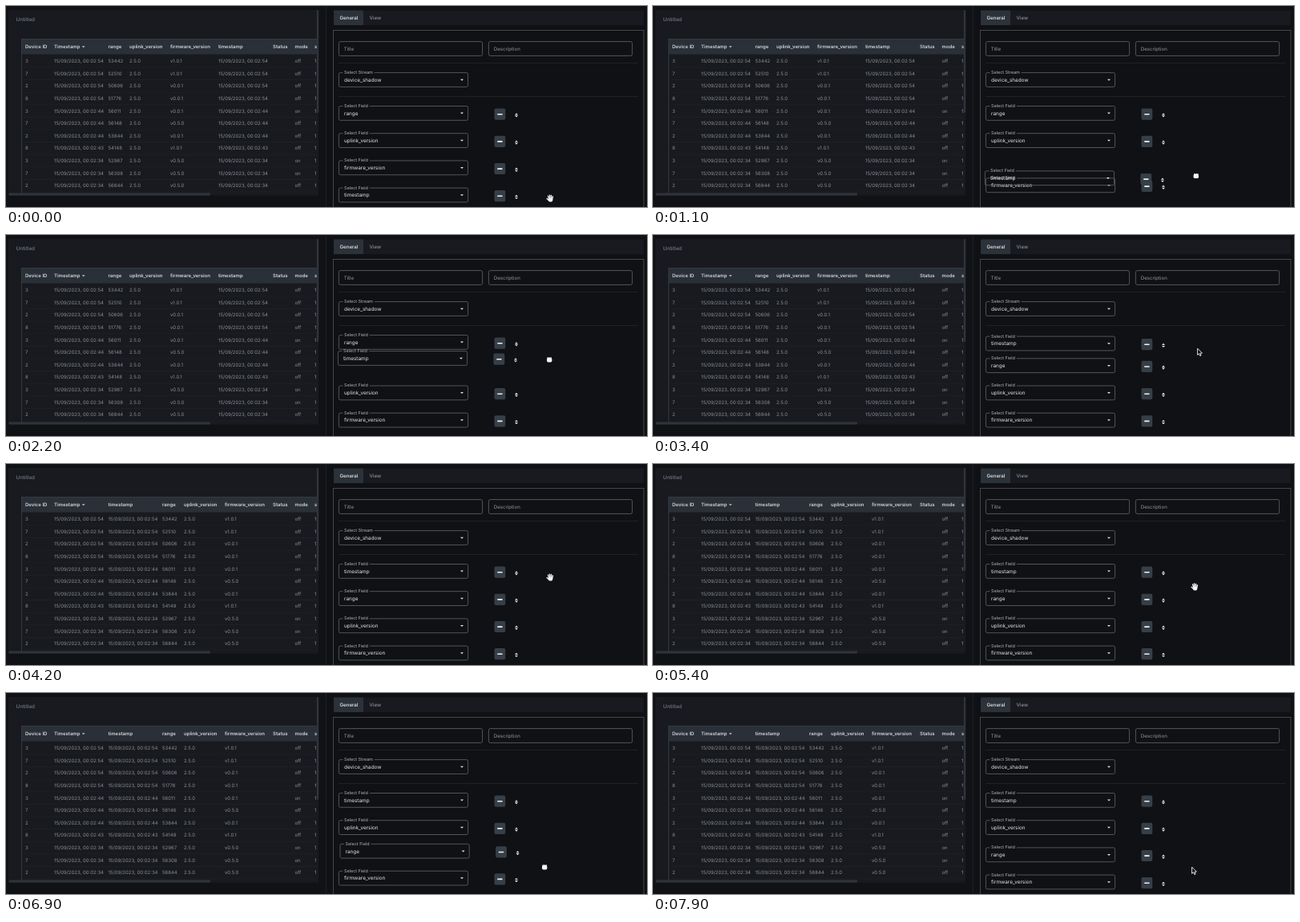
An HTML page with a canvas that plays this animation: 800x252 px, repeating every 8 s.

```html
<!DOCTYPE html>
<html lang="en">
<head>
<meta charset="utf-8">
<title>Table column order</title>
<style>
html, body { margin: 0; width: 100%; height: 100%; overflow: hidden; background: #111216; }
canvas { display: block; }
</style>
</head>
<body>
<canvas id="stage" width="800" height="252"></canvas>
<script>
const ctx = document.getElementById('stage').getContext('2d');
ctx.textRendering = 'geometricPrecision';

const LOOP = 8000, STEP = 100;
const TOP = 134.4, PITCH = 34.2, GAP = 29.3;
const slot = i => TOP + i * PITCH;

// time, x, y of the pointer
const POINTER = [
  [0, 679, 241], [700, 679, 241], [1400, 676.5, 191.5], [1500, 676, 184],
  [1600, 676, 178], [2100, 678, 158.5], [2200, 678, 156], [2500, 679, 142],
  [5200, 679, 142], [5800, 670, 177.5], [6300, 670, 177.5], [6400, 670, 181],
  [6900, 672, 218]
];

const RANGES = [53442, 52510, 50606, 51776, 56011, 56148, 53844, 54148, 52967, 56308, 56844];
const FIRMWARE = ['1.0', '1.0', '0.0', '0.0', '0.0', '0.5', '0.0', '1.0', '0.5', '0.5', '0.5'];
const SECONDS = [54, 54, 54, 54, 44, 44, 44, 43, 34, 34, 34];
const stamp = i => '15/09/2023, 00:02:' + SECONDS[i];
const version = i => 'v' + FIRMWARE[i] + (FIRMWARE[i] === '0.5' ? '.0' : '.1');

const clamp = p => Math.max(0, Math.min(1, p));
const ease = p => 1 - (1 - clamp(p)) ** 2;
const mix = (a, b, p) => a + (b - a) * p;

function pointer(time) {
  const t = Math.max(0, time);
  const k = POINTER.findIndex(key => key[0] > t);
  if (k < 0) return POINTER[POINTER.length - 1].slice(1);
  const a = POINTER[k - 1], b = POINTER[k], p = (t - a[0]) / (b[0] - a[0]);
  return [mix(a[1], b[1], p), mix(a[2], b[2], p)];
}

function rect(x, y, w, h, color, r = 0) {
  ctx.fillStyle = color;
  ctx.beginPath();
  ctx.roundRect(x, y, w, h, r);
  ctx.fill();
}

// returns the width of the text
function text(str, x, y, size, color, weight = 400) {
  ctx.font = `${weight} ${size}px Inter, sans-serif`;
  ctx.fillStyle = color;
  ctx.fillText(str, x, y + size * 0.36);
  return ctx.measureText(str).width;
}

// a negative h points up
function triangle(x, y, w, h, color) {
  ctx.fillStyle = color;
  ctx.beginPath();
  ctx.moveTo(x - w / 2, y - h / 2);
  ctx.lineTo(x + w / 2, y - h / 2);
  ctx.lineTo(x, y + h / 2);
  ctx.fill();
}

// gap is the width of the opening for a label in the top edge
function outline(x, y, w, h, gap = 0) {
  ctx.save();
  if (gap) {
    ctx.beginPath();
    ctx.rect(x - 2, y - 2, w + 4, h + 4);
    ctx.rect(x + 5, y - 2, gap, 4);
    ctx.clip('evenodd');
  }
  ctx.strokeStyle = '#63666b';
  ctx.lineWidth = 0.8;
  ctx.beginPath();
  ctx.roundRect(x, y, w, h, 2);
  ctx.stroke();
  ctx.restore();
}

function select(label, value, y, dx = 0) {
  const width = text(label, 422 + dx, y - 9.4, 5.45, '#b4b6b9');
  outline(415.4 + dx, y - 8.9, 161.2, 17.8, width + 3.5);
  text(value, 422 + dx, y, 6.4, '#e6e7e8');
  triangle(569 + dx, y + 0.2, 4, 2, '#e6e7e8');
}

function field(name, y, dx = 0) {
  select('Select Field', name, y, dx);
  rect(609.5 + dx, y - 5.9, 13.8, 14.2, '#363f48', 2);
  rect(613.2 + dx, y + 0.5, 6.4, 1.6, '#f2f3f4', 0.4);
  triangle(637 + dx, y + 0.9, 4, -2.2, '#e6e7e8');
  triangle(637 + dx, y + 4, 4, 2.2, '#e6e7e8');
}

function table(t) {
  const moved = t >= 4200;
  const columns = [
    ['Device ID', 24, i => [3, 7, 2, 8][i % 4]],
    ['Timestamp', 60, stamp],
    ['range', moved ? 195 : 127.5, i => RANGES[i]],
    ['uplink_version', moved ? 222 : 154, () => '2.5.0'],
    ['firmware_version', moved ? 273 : 205, version],
    ['timestamp', moved ? 127.5 : 265, stamp],
    ['Status', 333, () => ''],
    ['mode', 360.5, i => [4, 8, 9].includes(i) ? 'on' : 'off'],
    ['s', 385, () => '1']
  ];
  rect(3, 5, 387, 232.5, '#181a1f', 1);
  text('Untitled', 12.5, 16.3, 6.3, '#737a83', 500);
  ctx.save();
  ctx.beginPath();
  ctx.rect(19, 40, 369.5, 195);
  ctx.clip();
  rect(19.5, 41.5, 369, 19, '#2a3037');
  for (let i = 0; i < 11; i++) rect(19.5, 76.7 + i * 15.6, 369, 0.6, '#1f2226');
  ctx.strokeStyle = '#3a4047';
  ctx.lineWidth = 0.8;
  ctx.strokeRect(19.5, 41.5, 400, 220);
  for (const [title, x, cell] of columns) {
    text(title, x, 51, 6, '#d3d6d9', 600);
    for (let i = 0; i < 11; i++) text(cell(i), x, 69.1 + i * 15.6, 6, '#8b8f95');
  }
  triangle(96.7, 51.2, 3.8, 2, '#c4c7ca');
  ctx.restore();
  rect(3.5, 234.5, 251.5, 3, '#30343a', 1);
  rect(387.8, 5, 2.4, 129, '#30343a', 1);
}

function form() {
  rect(398.8, 0, 1.2, 252, '#1b1d21');
  rect(400, 0, 400, 252, '#101114');
  rect(409, 5.5, 387, 18.5, '#181a1f');
  rect(409, 5.5, 37, 18.5, '#2b3239', 1);
  text('General', 416.5, 14.8, 6.15, '#eceded', 500);
  text('View', 453.5, 14.8, 6.15, '#8d9197', 500);
  ctx.strokeStyle = '#494c51';
  ctx.lineWidth = 0.9;
  ctx.strokeRect(408.5, 30.5, 387.5, 240);
  outline(415.4, 44.6, 179.2, 17.8);
  text('Title', 421.7, 53.8, 6.1, '#94979b');
  outline(602.4, 44.6, 179.2, 17.8);
  text('Description', 608.8, 53.8, 6.1, '#94979b');
  rect(415, 71.2, 374, 0.7, '#25272b');
  select('Select Stream', 'device_shadow', 92.5);
  rect(415, 113.2, 374, 0.7, '#25272b');
}

function firstDrag(t) {
  const shift = start => GAP * ease((t - start) / 200);
  const [x, y] = pointer(t - STEP);
  const held = slot(3) + y - 241;
  field('range', slot(0) + shift(2300));
  field('uplink_version', slot(1) + shift(1600));
  field('firmware_version', slot(2) + shift(1000));
  field('timestamp', mix(held, slot(0), ease((t - 3300) / 300)), x - 679);
}

function secondDrag(t) {
  const shift = GAP * ease((t - 6600) / 200);
  const [x, y] = pointer(t - STEP);
  const drop = ease((t - 7400) / 400);
  const squeeze = PITCH - GAP;
  field('timestamp', slot(0));
  field('uplink_version', slot(2) - squeeze - shift);
  field('firmware_version', slot(3) - squeeze);
  field('range', mix(slot(1) + y - 181, slot(2), drop), (x - 670) * (1 - drop));
}

function fields(t) {
  const list = names => names.forEach((name, i) => field(name, slot(i)));
  if (t < 3800) firstDrag(t);
  else if (t < 6500) list(['timestamp', 'range', 'uplink_version', 'firmware_version']);
  else if (t < 7900) secondDrag(t);
  else list(['timestamp', 'uplink_version', 'range', 'firmware_version']);
}

function arrow() {
  ctx.fillStyle = '#08090a';
  ctx.strokeStyle = '#f4f4f4';
  ctx.lineWidth = 0.9;
  ctx.beginPath();
  [[0.6, 0.2], [0.6, 8.4], [2.5, 6.7], [3.8, 9.6], [5.1, 9], [3.9, 6.2], [6.4, 6.1]]
    .forEach(p => ctx.lineTo(...p));
  ctx.closePath();
  ctx.fill();
  ctx.stroke();
}

function openHand() {
  ctx.strokeStyle = '#f6f6f6';
  ctx.lineWidth = 1.4;
  ctx.lineCap = 'round';
  ctx.beginPath();
  [[-2.4, -2.8, -1.2, 1], [-0.5, -3.8, 0, 1], [1.5, -3.5, 1.4, 1],
   [3.4, -2, 2.7, 1.6], [-3.8, 0.4, -1.8, 2.4]].forEach(([a, b, c, d]) => {
    ctx.moveTo(a, b);
    ctx.lineTo(c, d);
  });
  ctx.stroke();
  rect(-2, 0.2, 5.2, 4.4, '#f6f6f6', 1.8);
}

function fist() {
  rect(-3, -2, 6.4, 5.4, '#f6f6f6', 1.9);
  for (let i = 0; i < 4; i++) rect(-2.6 + i * 1.45, -2.8, 1.25, 2, '#f6f6f6', 0.6);
}

function cursor(t) {
  ctx.save();
  ctx.translate(...pointer(t));
  if (t >= 7500 || (t >= 3400 && t < 3800)) arrow();
  else if (t >= 6500 || (t >= 100 && t < 3400)) fist();
  else openHand();
  ctx.restore();
}

function draw(now) {
  const t = Math.floor(now % LOOP / STEP) * STEP;
  rect(0, 0, 800, 252, '#111216');
  table(t);
  form();
  fields(t);
  cursor(t);
}

const start = performance.now();
function tick() {
  draw(Math.max(0, performance.now() - start));
  requestAnimationFrame(tick);
}
tick();
</script>
</body>
</html>
```
